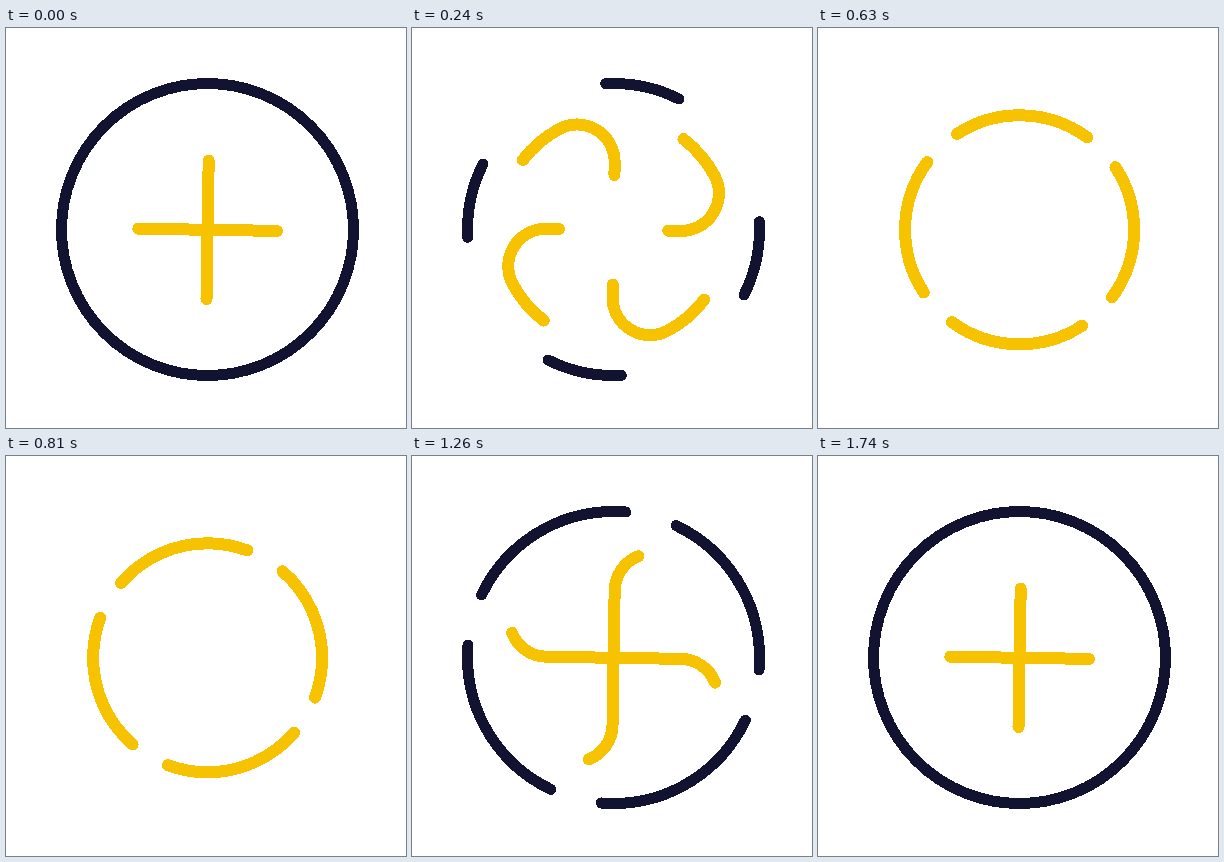
An HTML page that plays this animation: 400x400 px, repeating every 2.36 s.

```html
<!DOCTYPE html>
<html lang="en">
<head>
<meta charset="utf-8">
<title>Plus loop</title>
<style>
  html, body { margin: 0; width: 100%; height: 100%; overflow: hidden; background: #fff; }
  svg { display: block; width: 100vw; height: 100vh; shape-rendering: crispEdges; }
  path, circle { fill: none; stroke-linecap: round; stroke-linejoin: round; }
  circle { stroke: #121331; stroke-width: 11; }
  path { stroke: #f7c300; stroke-width: 12; }
</style>
</head>
<body>
<svg viewBox="0 0 400 400">
  <circle id="rim" cx="201.5" cy="201.5" r="146" pathLength="360"/>
  <g id="arms" transform="translate(201.6 201.8) rotate(0.9)"></g>
</svg>
<script>
const LOOP = 2360, STEP = 30, END = 1740;
const RING = 114.5, BEND = 37.5, HALF = 69.3;

// Each arm leaves the cross, follows half the ring and returns on the far side.
const gap = RING - BEND;
const turn = Math.sqrt(gap * gap - BEND * BEND);
const x = RING * BEND / gap, y = RING * turn / gap;
const arc = (r, px, py) => `A${r} ${r} 0 0 0 ${px} ${py}`;
const route = [
  `M0 ${HALF}V${-turn}`,
  arc(BEND, -x, -y),
  arc(RING, -x, y),
  arc(BEND, 0, turn),
  `V${-HALF}`
].join(" ");

const rim = document.getElementById("rim");
const group = document.getElementById("arms");
const arms = [0, 90, 180, 270].map(angle => {
  const arm = document.createElementNS("http://www.w3.org/2000/svg", "path");
  arm.setAttribute("d", route);
  arm.setAttribute("transform", `rotate(${angle})`);
  arm.setAttribute("stroke-dasharray", `${2 * HALF} 2000`);
  group.append(arm);
  return arm;
});

// Time in ms, distance travelled, speed per ms
const travel = [
  [0, 0, 0.3],
  [240, 124, 0.52],
  [480, 234, 0.35],
  [810, 297, 0.31],
  [1050, 392, 0.46],
  [1260, 491, 0.36],
  [1440, 527, 0.08],
  [END, 533.4, 0]
];

function distance(t) {
  const i = Math.max(1, travel.findIndex(key => key[0] >= t));
  const [t0, d0, v0] = travel[i - 1];
  const [t1, d1, v1] = travel[i];
  const span = t1 - t0, u = (t - t0) / span, w = 1 - u;
  return d0 * w * w * (1 + 2 * u) + d1 * u * u * (1 + 2 * w)
    + span * u * w * (v0 * w - v1 * u);
}

function ease(t, from, to) {
  const u = Math.min(1, Math.max(0, (t - from) / (to - from)));
  return u * u * (3 - 2 * u);
}

function drawRim(t) {
  const closing = t > 600;
  const size = 90 * (closing ? ease(t, 860, 1440) : 1 - ease(t, 0, 390));
  const start = closing ? 4.8 - size : -3.1;
  rim.style.visibility = size > 0 ? "visible" : "hidden";
  rim.setAttribute("stroke-dasharray", size < 90 ? `${size} ${90 - size}` : "none");
  rim.setAttribute("stroke-dashoffset", -start);
}

function draw() {
  const now = performance.now() % LOOP;
  const t = Math.min(END, Math.floor((now + 1) / STEP) * STEP);
  const offset = -distance(t);
  arms.forEach(arm => arm.setAttribute("stroke-dashoffset", offset));
  drawRim(t);
  requestAnimationFrame(draw);
}
draw();
</script>
</body>
</html>
```
